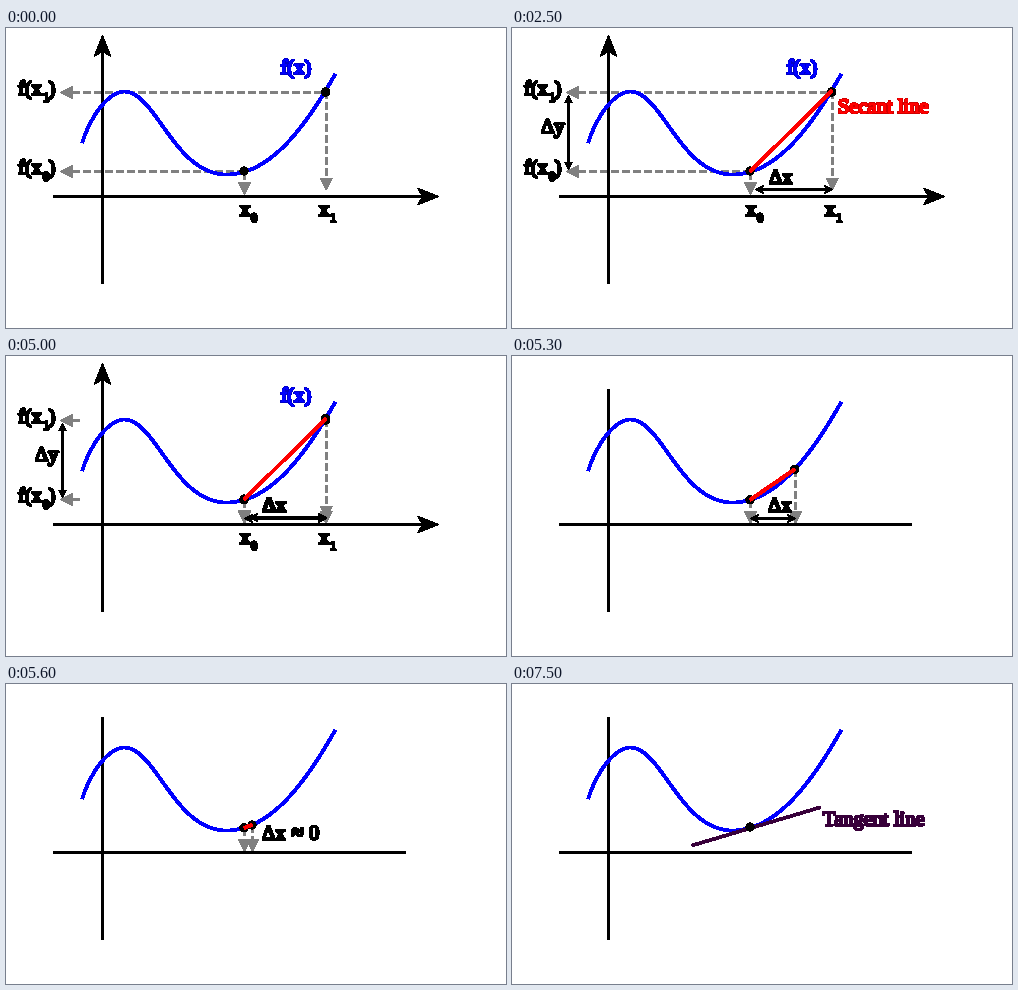
A matplotlib script that plays this animation: 500 px wide and 300 px high, repeating every 8000 ms.

```python
import numpy as np
import matplotlib.pyplot as plt
from matplotlib.animation import FuncAnimation
from matplotlib.patheffects import withStroke

W, H, DPI = 500, 300, 100
PT = 72 / DPI
STEP_MS, FRAMES = 50, 160

BLACK, BLUE, RED, GRAY = "#000000", "#0000ff", "#ff0000", "#808080"
PURPLE = "#38003a"
X0, X1, X_NEAR = 238, 319.6, 246
Y0, Y1 = 143, 64
AXIS_X, AXIS_Y = 96, 168

# hard pixel edges everywhere
plt.rcParams.update({"lines.antialiased": False, "patch.antialiased": False,
                     "text.antialiased": False})

fig = plt.figure(figsize=(W / DPI, H / DPI), dpi=DPI, facecolor="white")
ax = fig.add_axes([0, 0, 1, 1])


def bezier(a, b, c, d):
    t = np.linspace(0, 1, 80)[:, None]
    a, b, c, d = map(np.array, (a, b, c, d))
    return (a * (1 - t) ** 3 + 3 * b * t * (1 - t) ** 2
            + 3 * c * t ** 2 * (1 - t) + d * t ** 3)


CURVE = 0.2 + np.vstack([
    bezier((76, 114.5), (83, 92), (100, 64), (118, 63.3)),
    bezier((118, 63.3), (150, 64), (168, 146), (220, 146.3)),
    bezier((220, 146.3), (265, 146.3), (300, 97), (329, 46)),
])


def curve_y(x):
    return np.interp(x, CURVE[:, 0], CURVE[:, 1])


def line(a, b, color, width, z=2, **kw):
    ax.plot([a[0], b[0]], [a[1], b[1]], color=color, lw=width * PT,
            zorder=z, solid_capstyle="butt", dash_capstyle="butt", **kw)


def head(tip, way, length, half, color=BLACK, notch=0, z=3):
    """Arrowhead at the centre of the tip pixel, pointing along way."""
    tip, way = np.array(tip) + 0.5, np.array(way, float)
    side = np.array([-way[1], way[0]]) * half
    back = tip - way * length
    ax.fill(*zip(tip, back + side, back + way * notch, back - side),
            color=color, lw=0, zorder=z)


def text(x, y, s, color=BLACK, size=20.5, edge=None):
    ax.text(x, y, s, color=color, fontsize=size * PT, zorder=8,
            family="Liberation Serif", va="baseline", ha="left",
            path_effects=[withStroke(linewidth=1.4 * PT,
                                     foreground=edge or color)])


def dot(x, y):
    ax.add_patch(plt.Circle((x, y), 4.1, color=BLACK, lw=0, zorder=5))


def double_arrow(a, b):
    a, b = np.array(a, float), np.array(b, float)
    gap = np.hypot(*(b - a))
    way = (b - a) / gap
    size = min(8, gap / 2)
    line(a + way * 3, b - way * 3, BLACK, 1.4, z=4)
    head(a, -way, size, 4, notch=2, z=4)
    head(b, way, size, 4, notch=2, z=4)


def dashed(a, b):
    line(a, b, GRAY, 2.6, z=1, ls=(0, (8 / 2.6, 4 / 2.6)))


def drop(x, tip):
    """Dashed arrow from the curve down towards the axis."""
    dashed((x, curve_y(x)), (x, tip - 12))
    head((x, tip), (0, 1), 12, 6, GRAY, z=1)


def graph():
    line((47, AXIS_Y), (399, AXIS_Y), BLACK, 3)
    line((AXIS_X, 255), (AXIS_X, 33), BLACK, 3)
    ax.plot(*CURVE.T, color=BLUE, lw=2.7 * PT, zorder=4,
            solid_capstyle="butt")


def labels():
    line((399, AXIS_Y), (418, AXIS_Y), BLACK, 3)
    line((AXIS_X, 33), (AXIS_X, 22), BLACK, 3)
    head((432, AXIS_Y), (1, 0), 21, 8.5, notch=5)
    head((AXIS_X, 7), (0, -1), 21, 8.5, notch=5)
    text(274.5, 46, "f(x)", BLUE, edge="#0000c8")
    for y, n in ((67, "1"), (146, "0")):
        text(12, y, "f(x")
        text(37, y + 6.5, n, size=12.5)
        text(42.5, y, ")")
    for x, n in ((234, "0"), (313, "1")):
        text(x, 187.5, "x")
        text(x + 11, 194, n, size=12.5)


def guides(left_only):
    for x, y in ((X1, Y1), (X0, Y0)):
        dashed((66, y), (74 if left_only else x, y))
        head((54, y), (-1, 0), 12, 6, GRAY, z=1)
    drop(X0, 166)
    drop(X1, 161.5)


def deltas():
    double_arrow((56, 66.5), (56, 141.5))
    text(29, 105, "Δy")
    double_arrow((243, 161), (320, 161))
    text(257, 155.5, "Δx")


def secant(x):
    line((X0, curve_y(X0)), (x, curve_y(x)), RED, 2.8, z=6)


def static_scene(ms):
    labels()
    guides(left_only=ms >= 5000)
    dot(X0, Y0)
    dot(X1, Y1)
    if ms >= 1250:
        deltas()
    if 2500 <= ms < 5000:
        secant(X1)
        text(326, 85, "Secant line", RED, edge="#d00000")


def closing_scene(ms):
    done = min((ms - 5000) / 600, 1)
    x = X1 + (X_NEAR - X1) * done
    drop(X0, 167)
    drop(x, 167)
    dot(X0, curve_y(X0))
    dot(x, curve_y(x))
    secant(x)
    text(256, 155.5, "Δx")
    if done < 1:
        double_arrow((X0, 162), (x, 162))
    else:
        text(285.5, 155.5, "≈", size=22)
        text(303, 155.5, "0")


def tangent_scene(ms):
    grow = min((ms - 7000) / 500, 1)
    mid = np.array([X0, 144])
    left, right = np.array([180, 161.5]), np.array([308.5, 123.3])
    line(mid + (left - mid) * grow, mid + (right - mid) * grow,
         PURPLE, 2.6, z=4.5)
    dot(X0, Y0)
    if grow == 1:
        text(311, 141.5, "Tangent line", PURPLE)


def draw(i):
    ms = i * STEP_MS
    move_ms = ms // 100 * 100  # motion advances every 100 ms
    ax.clear()
    ax.set(xlim=(0, W), ylim=(H, 0))
    ax.axis("off")
    graph()
    if move_ms <= 5000:
        static_scene(ms)
    if 5000 <= move_ms < 7100:
        closing_scene(move_ms)
    elif move_ms >= 7100:
        tangent_scene(move_ms)
    return []


anim = FuncAnimation(fig, draw, frames=FRAMES, interval=STEP_MS,
                     init_func=lambda: [], repeat=True, repeat_delay=0)
plt.show()
```
